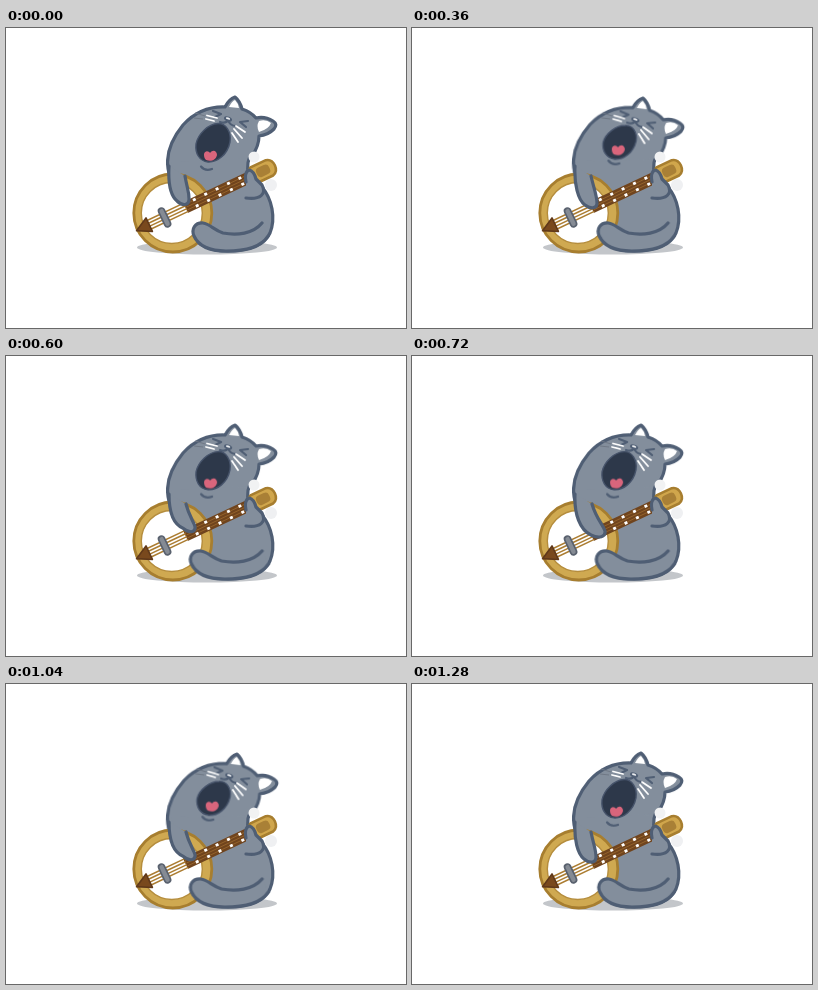
An HTML page for the animation above (1320 ms loop, 400 by 300 pixels).

```html
<!DOCTYPE html>
<html lang="en">
<head>
<meta charset="utf-8">
<title>Singing cat with banjo</title>
<style>
  html, body { margin: 0; width: 100%; height: 100%; overflow: hidden; background: #fff; }
  svg { display: block; width: 400px; height: 300px; }
  .fur { fill: #838e9c; stroke: #4f5e74; stroke-width: 3.2; stroke-linecap: round; stroke-linejoin: round; }
  .line { fill: none; stroke: #4f5e74; stroke-width: 2.2; stroke-linecap: round; stroke-linejoin: round; }
  .white { fill: none; stroke: #fff; stroke-width: 1.8; stroke-linecap: round; }

  /* Two notes and three strums fit in one 1320 ms loop. */
  .head, .mouth, .jaw { animation: 660ms ease-in-out infinite; }
  .head { animation-name: sway; transform-origin: 205px 150px; }
  .mouth { animation-name: sing; }
  .jaw { animation-name: lift; }
  .arm { animation: strum 440ms linear infinite; }
  .tail { animation: wag 440ms ease-in-out infinite; transform-origin: 255px 205px; }

  @keyframes sway { 50% { transform: translate(-.6px, .3px) rotate(1.9deg); } }
  @keyframes lift { 50% { transform: translate(1.5px, -6px); } }
  @keyframes wag { 50% { transform: scaleX(1.045); } }
  @keyframes sing {
    0%, 100% { d: path("M212 95.5C220 95 225.5 104 224 114C221.5 127 211 134.5 202 134C193 133 189 125 190 116C192 106 202 96 212 95.5Z"); }
    50% { d: path("M212 97C220 96 224.5 104 223.5 112C221 124 212 131 203 131C194 130 190 123 190.5 115C192 106 203 97 212 97Z"); }
  }
  @keyframes strum {
    0%, 100% { d: path("M163 138C162 155 165 168 171 173C176 178 183 178 183 171C183 163 181 160 179 148"); }
    36% { d: path("M163 138C163 155 167 168 177 172C183 177 189 177 189 171C188 166 183 160 180 148"); }
    64% { d: path("M163 138C162 158 168 174 179 179C187 183 194 181 193 175C191 169 184 162 180 148"); }
    82% { d: path("M163 138C162 156 166 172 173 177C178 181 185 181 185 175C185 168 182 161 179 148"); }
  }
</style>
</head>
<body>
<svg viewBox="0 0 400 300">
  <ellipse cx="201" cy="219.5" rx="70" ry="7" fill="#c3c6ca"/>
  <ellipse cx="265" cy="157" rx="6" ry="6" fill="#eff0f2"/>

  <path class="fur" d="M247 122C242 132 240 138 243 146L256 159C266 171 270 190 264 205C257 220 238 224 216 223C197 221 187 213 187 203L175 150"/>

  <g class="head">
    <path class="fur" d="M163 145C159 130 164 113 177 97C189 84 204 78.5 219 79Q223 71 229 69Q234 73 236 81Q245 84 250 90Q259 88 267 93Q272 96 268 101Q262 107 253 108Q253 118 246 128"/>
    <path d="M170 148L165 134L240 130L240 155L185 165Z" fill="#838e9c"/>
    <path d="M223 79Q226 73 229 72Q232 75 233 80ZM253 93Q260 91 265 95Q263 101 253 104Q250 98 253 93Z" fill="#fff"/>
    <path class="line" d="M207 83L215 86L209 89M242 93L234 94L240 99"/>
    <path class="line" d="M214 94Q220 96 222 92Q224 98 230 98"/>
    <ellipse cx="222" cy="91" rx="4.2" ry="2.4" transform="rotate(20 222 91)" fill="#4f5e74"/>
    <ellipse cx="222" cy="90.4" rx="2.2" ry="1" transform="rotate(20 222 90.4)" fill="#eef0f2"/>
    <path d="M188 90L197 91M189 85L199 88" fill="none" stroke="#6f7885"/>
    <path class="white" d="M201 87.5L211 90M200 91L208 93M230 98L239 104M228 101L236 110M226 105L232 114"/>
    <path class="mouth" fill="#2d384a" stroke="#46536a" stroke-width="1.4" d="M212 95.5C220 95 225.5 104 224 114C221.5 127 211 134.5 202 134C193 133 189 125 190 116C192 106 202 96 212 95.5Z"/>
    <g class="jaw">
      <path fill="#d9657c" d="M198 126C199 122 203 123 204 125C207 121 211 123 211 127C210 132 205 134 200 132C198 130 198 128 198 126Z"/>
      <path class="line" d="M195 138.5Q199 143.5 206 141"/>
    </g>
  </g>
  <ellipse cx="248" cy="129" rx="5.5" ry="5.5" fill="#f1f2f3"/>

  <circle cx="166.8" cy="185" r="39" fill="#cfa951" stroke="#a77e2f" stroke-width="2.8"/>
  <circle cx="165.8" cy="185" r="30.5" fill="#fff" stroke="#b58d3d" stroke-width="1.4"/>
  <g transform="translate(165.8 186) rotate(-25.3)">
    <path d="M83 -4L91 -8.5H108Q114 -7 114 0Q114 7 108 8.5H91L83 4Z" fill="#d0a64c" stroke="#a77e2f" stroke-width="2.6" stroke-linejoin="round"/>
    <rect x="94" y="-5" width="14" height="10" rx="4" fill="#a98036"/>
    <rect x="15" y="-6" width="70" height="12" rx="1" fill="#70441d"/>
    <path d="M-28 -4.7H16M-28 -1.6H16M-28 1.6H16M-28 4.7H16" stroke="#ab7c30" stroke-width="1.5"/>
    <path d="M16 -3H84M16 0H84M16 3H84" stroke="#98672e" stroke-width=".8"/>
    <path d="M25 -3.4H80M25 3.4H80" stroke="#fff" stroke-width="2.8" stroke-dasharray="3 9.6"/>
    <path d="M-39 0L-25 -7.5V7.5Z" fill="#79491d" stroke="#60391a" stroke-width="1.6" stroke-linejoin="round"/>
    <rect x="-11" y="-10" width="6" height="20" rx="3" fill="#858b94" stroke="#59616e" stroke-width="1.7"/>
  </g>

  <path class="fur tail" d="M256 195C247 206 231 207.5 217 205C208 202 204 196 197 195C189 194.5 185 201 188 208C193 219 206 223 220 223C240 223 255 219 262 208"/>
  <path class="fur arm" d="M163 138C162 155 165 168 171 173C176 178 183 178 183 171C183 163 181 160 179 148"/>
  <path class="fur" d="M240 154Q238 144 243 142Q248 143 250 151L256 157C261 166 254 172 240 170"/>
</svg>
</body>
</html>
```
